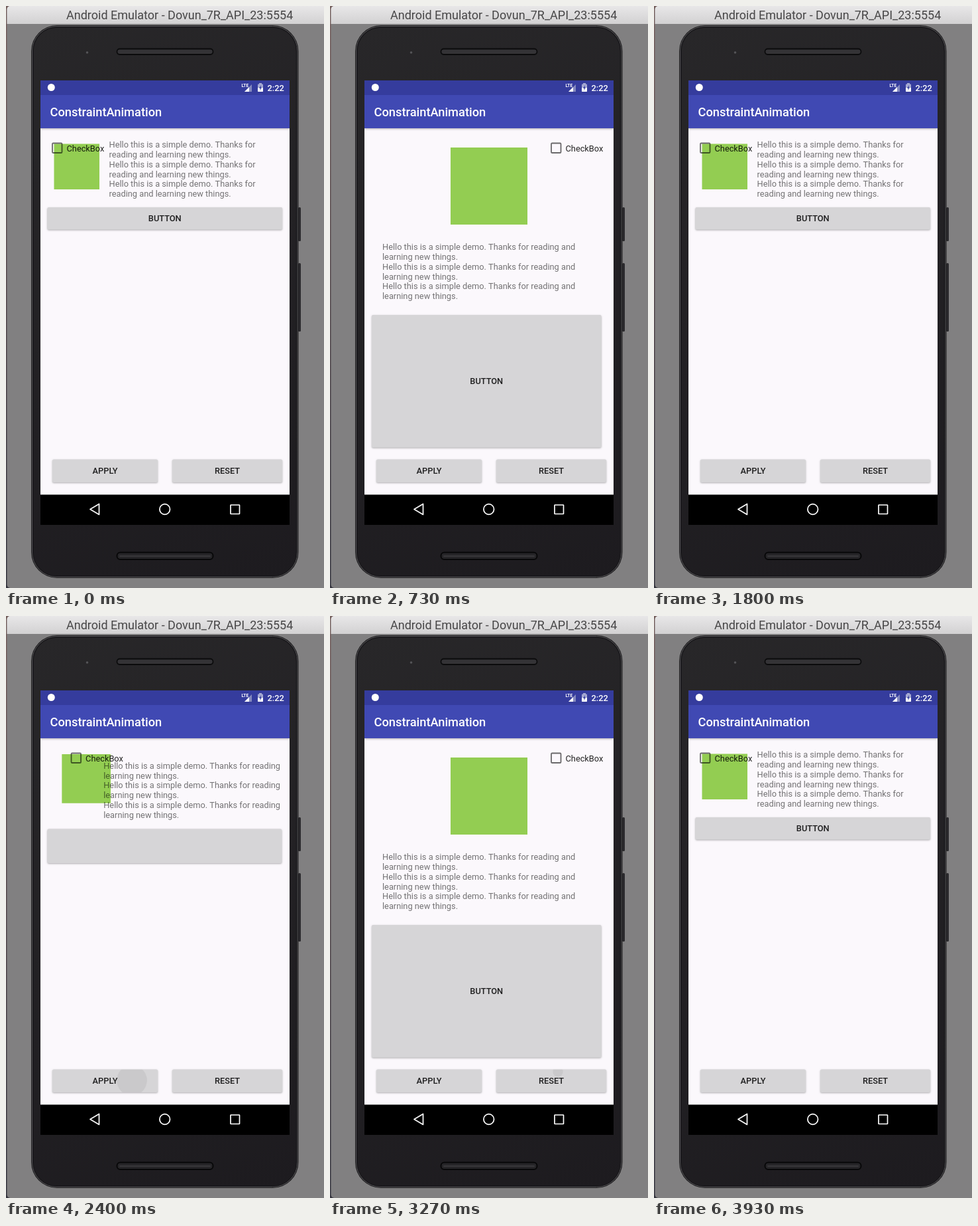
Animation, 480 px wide and 876 px high, one loop 3.99 s. Source, as an HTML page with a canvas:

```html
<!DOCTYPE html>
<html lang="en">
<head>
<meta charset="utf-8">
<title>Constraint animation</title>
<style>
html, body { margin: 0; width: 100%; height: 100%; overflow: hidden; background: #818081; }
canvas { display: block; width: 480px; height: 876px; }
</style>
</head>
<body>
<canvas id="stage" width="480" height="876"></canvas>
<script>
const ctx = document.getElementById('stage').getContext('2d');
const LOOP = 3990, STEP = 66.5, MOVE = 300, FADE_END = 350;
const INK = 'rgba(0,0,0,0.86)', SOFT = 'rgba(0,0,0,0.54)';

const apply = { x: 70, y: 682.5, w: 159, h: 34.5, label: 'APPLY' };
const reset = { x: 251, y: 682.5, w: 166, h: 34.5, label: 'RESET' };

// Each tap starts a layout change; cx, cy is the centre of its ripple.
const taps = [
  { at: 350, open: true, btn: apply, cx: 190, cy: 699 },
  { at: 1443, open: false, btn: reset, cx: 350, cy: 702 },
  { at: 2330, open: true, btn: apply, cx: 190, cy: 699 },
  { at: 3298, open: false, btn: reset, cx: 344, cy: 686 }
];

const compact = {
  icon: [72.5, 207.5, 68.5], check: 69.5, text: [155.5, 213, 262], button: [62.5, 303, 354.5, 33.5],
  lines: ['Hello this is a simple demo. Thanks for', 'reading and learning new things.']
};
const expanded = {
  icon: [182, 213, 116], check: 333.5, text: [79, 367, 300], button: [63, 465, 346.5, 199.5],
  lines: ['Hello this is a simple demo. Thanks for reading and', 'learning new things.']
};

const mix = (a, b, p) => a + (b - a) * p;
const mixAll = (a, b, p) => a.map((v, i) => mix(v, b[i], p));
const ease = t => 0.5 - Math.cos(Math.PI * Math.min(1, Math.max(0, t))) / 2;

function box(x, y, w, h, r, fill, line, width = 1) {
  ctx.beginPath();
  ctx.roundRect(x, y, w, h, r);
  if (fill) { ctx.fillStyle = fill; ctx.fill(); }
  if (line) { ctx.strokeStyle = line; ctx.lineWidth = width; ctx.stroke(); }
}

function write(str, x, y, size, color, weight = 400, align = 'left') {
  ctx.font = `${weight} ${size}px Roboto, sans-serif`;
  ctx.textAlign = align;
  ctx.fillStyle = color;
  ctx.fillText(str, x, y);
}

function disc(x, y, r, fill) {
  ctx.beginPath();
  ctx.arc(x, y, r, 0, Math.PI * 2);
  ctx.fillStyle = fill;
  ctx.fill();
}

function poly(points) {
  ctx.beginPath();
  points.forEach(p => ctx.lineTo(...p));
  ctx.closePath();
}

function fade(x0, y0, x1, y1, from, to) {
  const g = ctx.createLinearGradient(x0, y0, x1, y1);
  g.addColorStop(0, from);
  g.addColorStop(1, to);
  return g;
}

function clipped(x, y, w, h, draw) {
  ctx.save();
  ctx.beginPath();
  ctx.rect(x, y, w, h);
  ctx.clip();
  draw();
  ctx.restore();
}

function plate(x, y, w, h) {
  ctx.save();
  ctx.shadowColor = 'rgba(0,0,0,0.3)';
  ctx.shadowBlur = 2.5;
  ctx.shadowOffsetY = 1;
  box(x, y, w, h, 2, '#d6d5d7');
  ctx.restore();
}

function drawWindow() {
  ctx.fillStyle = fade(0, 0, 0, 876, '#76605e', '#35353f');
  ctx.fillRect(0, 0, 480, 876);
  box(1.5, 0, 490, 876, 5, '#818081');
  box(1.5, 0, 490, 27, [5, 0, 0, 0], fade(0, 0, 0, 27, '#e8e7e8', '#d2d1d2'));
  write('Android Emulator - Dovun_7R_API_23:5554', 91, 20, 18, '#474647');
}

function drawPhone() {
  box(441, 303, 4, 51, 1.5, '#2b2a2d');
  box(441, 387, 4, 103, 1.5, '#2b2a2d');
  box(38, 29, 403.5, 832, 39, '#1a191b');
  box(39.5, 30.5, 400.5, 829, 37.5, fade(40, 30, 440, 860, '#282729', '#1d1b1f'), '#59585b', 1);
  box(41, 32, 397.5, 826, 36, null, '#1a191c', 1.5);
  box(167.5, 64.5, 145, 8.5, 4.2, '#343336', '#0b0b0c', 1.8);
  box(167.5, 822.5, 145, 10.5, 5, '#262528', '#070708', 2);
  box(171, 827, 138, 2, 1, '#38373a');
  disc(122.5, 70, 1.8, '#555558');
}

function drawBars() {
  ctx.save();
  ctx.shadowColor = 'rgba(0,0,0,0.3)';
  ctx.shadowBlur = 3;
  ctx.shadowOffsetY = 1;
  clipped(52, 112, 376, 80, () => box(52, 134, 376, 50, 0, '#4049b3'));
  ctx.restore();
  box(52, 112, 376, 22, 0, '#353c9d');
  write('ConstraintAnimation', 66.5, 166.3, 18.3, '#fff', 500);

  disc(68.3, 122.5, 5.5, '#fff');
  write('LTE', 355.5, 122, 6.5, '#fff', 700);
  poly([[360, 129], [371, 118], [371, 129]]);
  ctx.fillStyle = '#858abf';
  ctx.fill();
  poly([[360, 129], [367, 122], [367, 129]]);
  ctx.fillStyle = '#fff';
  ctx.fill();
  box(382, 116, 4, 2, 0, '#a5a9d2');
  box(380, 117.5, 8, 11.5, 1, '#a5a9d2');
  box(380, 123, 8, 6, 1, '#fff');
  poly([[385, 119], [382, 124], [384, 124], [383, 128], [386, 122.5], [384.5, 122.5]]);
  ctx.fillStyle = '#353c9d';
  ctx.fill();
  write('2:22', 394.5, 127.5, 12.8, '#fff', 500);

  box(52, 735.5, 376, 45.5, 0, '#000');
  ctx.strokeStyle = '#fff';
  ctx.lineWidth = 1.7;
  ctx.lineJoin = 'round';
  poly([[127, 757.5], [140.5, 749.5], [140.5, 765.5]]);
  ctx.stroke();
  ctx.beginPath();
  ctx.arc(239.7, 757.5, 7.8, 0, Math.PI * 2);
  ctx.stroke();
  box(339, 751, 13.5, 13.5, 0.5, null, '#fff', 1.7);
}

function drawContent(from, to, p) {
  const [ix, iy, side] = mixAll(from.icon, to.icon, p);
  box(ix, iy, side, side, 0, '#93cd52');

  const [bx, by, bw, bh] = mixAll(from.button, to.button, p);
  plate(bx, by, bw, bh);
  clipped(bx, by, bw, bh, () =>
    write('BUTTON', bx + to.button[2] / 2, by + to.button[3] / 2 + 4.7, 12.8, INK, 500, 'center'));

  const [tx, ty, tw] = mixAll(from.text, to.text, p);
  clipped(tx, ty - 16, tw, 100, () => {
    for (let i = 0; i < 6; i++) write(to.lines[i % 2], tx, ty + i * 14.85, 12.8, SOFT);
  });

  const cx = mix(from.check, to.check, p);
  box(cx + 0.5, 206.5, 14.5, 14.5, 1.3, null, 'rgba(0,0,0,0.58)', 1.8);
  write('CheckBox', cx + 22, 218.6, 12.8, INK);
}

function drawRipple(tap, age) {
  const r = 26 + (age - 85) * 0.147;
  if (r <= 0 || age >= FADE_END) return;
  const alpha = 0.055 * Math.min(1, (FADE_END - age) / 150);
  const b = tap.btn;
  clipped(b.x, b.y, b.w, b.h, () => disc(tap.cx, tap.cy, r, `rgba(0,0,0,${alpha})`));
}

function draw(t) {
  let last = null;
  for (const tap of taps) if (t >= tap.at) last = tap;
  const open = last ? last.open : false;
  const p = last ? ease((t - last.at) / MOVE) : 1;

  drawWindow();
  drawPhone();
  box(52, 112, 376, 669, 0, '#fbf8fc');
  drawContent(open ? compact : expanded, open ? expanded : compact, p);
  for (const b of [apply, reset]) plate(b.x, b.y, b.w, b.h);
  for (const tap of taps) drawRipple(tap, t - tap.at);
  for (const b of [apply, reset]) write(b.label, b.x + b.w / 2, 704, 12.8, INK, 500, 'center');
  drawBars();
}

const start = performance.now();
function tick() {
  const t = (performance.now() - start) % LOOP;
  draw(Math.floor((t + 3) / STEP) * STEP % LOOP);
  requestAnimationFrame(tick);
}
tick();
</script>
</body>
</html>
```
